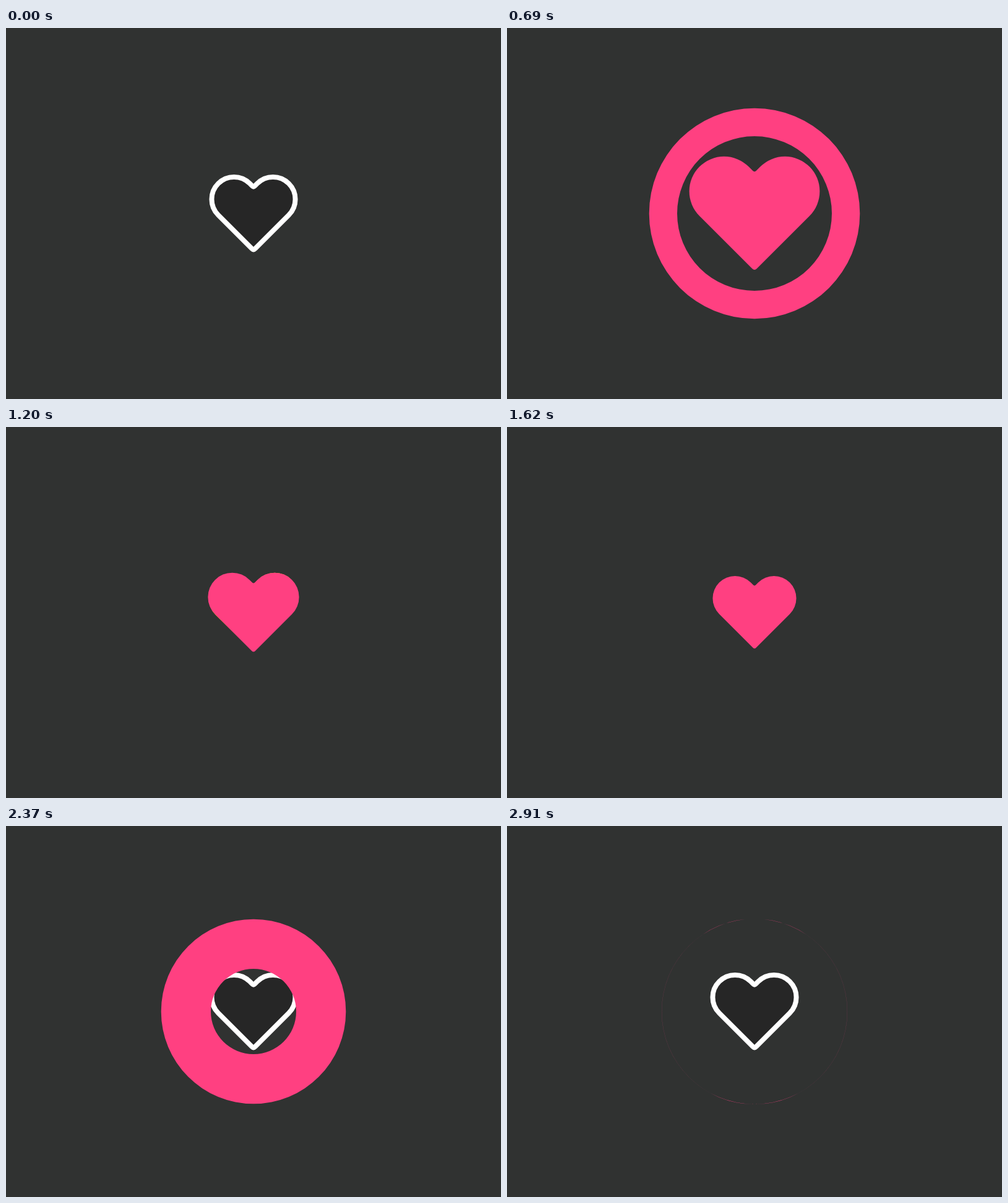
An HTML page with a canvas that plays this animation: 800 by 600 pixels, repeating every 3.39 s.

```html
<!DOCTYPE html>
<html lang="en">
<head>
<meta charset="utf-8">
<title>Like button</title>
<style>
  html, body { margin: 0; width: 100%; height: 100%; overflow: hidden; background: #303231; }
  canvas { display: block; width: 800px; height: 600px; }
</style>
</head>
<body>
<canvas id="stage" width="800" height="600"></canvas>
<script>
const ctx = document.getElementById('stage').getContext('2d');
const LOOP = 3390, STEP = 30;
const LIKE = 330, UNLIKE = 2130, RING_TIME = 780;
const BG = '#303231', PINK = '#ff4081', YELLOW = '#ffcc00', PURPLE = '#aa33cc';

const heart = new Path2D(
  'M-57 2.5 A36 36 0 0 1 -6 -48.5 L-2 -44.5 Q0 -42.5 2 -44.5 L6 -48.5' +
  'A36 36 0 0 1 57 2.5 L2.5 57 Q0 59.5 -2.5 57 Z');

// Smooth monotone curve through [time, value] keys
function curve(keys) {
  const slope = i => (keys[i + 1][1] - keys[i][1]) / (keys[i + 1][0] - keys[i][0]);
  const last = keys.length - 1;
  const tangent = keys.map((k, i) => {
    if (i === 0) return slope(0);
    if (i === last) return 0;
    const a = slope(i - 1), b = slope(i);
    return a * b <= 0 ? 0 : 2 * a * b / (a + b);
  });
  return t => {
    if (t <= keys[0][0]) return keys[0][1];
    if (t >= keys[last][0]) return keys[last][1];
    let i = 0;
    while (t > keys[i + 1][0]) i++;
    const [t0, v0] = keys[i], [t1, v1] = keys[i + 1];
    const d = t1 - t0, x = (t - t0) / d, y = 1 - x;
    return v0 * (1 + 2 * x) * y * y + v1 * x * x * (3 - 2 * x) +
      d * x * y * (tangent[i] * y - tangent[i + 1] * x);
  };
}

const outer = curve([[-30, 0], [150, 104.5], [240, 149.3], [330, 171.6], [360, 170.3],
  [510, 157.5], [600, 151.5], [780, 150.05]]);
const inner = curve([[150, 0], [240, 69], [360, 125], [510, 141.5], [600, 146.5], [780, 149.95]]);
const press = curve([[30, 1], [180, 0.86], [330, 0.72]]);
const pop = curve([[450, 0], [460, 0], [720, 1.62], [990, 0.855], [1200, 1.09],
  [1380, 0.965], [1500, 1.015], [1620, 1]]);

function wobble(t) {
  return t > 800 && t < 1560
    ? Math.sin((t - 800) * 2 * Math.PI / 520) * Math.exp((930 - t) / 200) : 0;
}

function place(sx, sy, skew, draw) {
  ctx.save();
  ctx.transform(sx, skew * sx, 0, sy, 400, 300);
  draw();
  ctx.restore();
}

function fillHeart(color, sx, sy = sx, skew = 0) {
  place(sx, sy, skew, () => {
    ctx.fillStyle = color;
    ctx.fill(heart);
  });
}

function echo(t, color, delay, skew, squash) {
  const s = pop(t - delay), w = wobble(t);
  fillHeart(color, s * (1 + squash * w), s * (1 - squash * w), skew * w);
}

function outlineHeart(s) {
  place(s, s, 0, () => {
    ctx.fillStyle = '#262626';
    ctx.fill(heart);
    ctx.strokeStyle = '#fff';
    ctx.lineWidth = 8;
    ctx.lineJoin = 'round';
    ctx.stroke(heart);
  });
}

function ring(t) {
  const r = inner(t);
  ctx.fillStyle = PINK;
  ctx.beginPath();
  ctx.arc(400, 300, outer(t), 0, 2 * Math.PI);
  if (r > 0) {
    ctx.moveTo(400 + r, 300);
    ctx.arc(400, 300, r, 0, 2 * Math.PI, true);
  }
  ctx.fill();
}

function render(t) {
  ctx.fillStyle = BG;
  ctx.fillRect(0, 0, 800, 600);

  if (t < LIKE + 150) {
    outlineHeart(press(t));
  } else if (t >= UNLIKE + 150) {
    outlineHeart(1);
  } else {
    if (t < 1560) {
      echo(t, PURPLE, 43, 0.045, 0.037);
      echo(t, YELLOW, 37, 0.1, 0.008);
    }
    fillHeart(PINK, pop(t));
  }

  if (t >= UNLIKE) ring(t - UNLIKE);
  else if (t >= LIKE && t < LIKE + RING_TIME) ring(t - LIKE);
}

const start = performance.now();
function tick() {
  const t = (performance.now() - start) % LOOP;
  render(Math.floor(t / STEP) * STEP);
  requestAnimationFrame(tick);
}
tick();
</script>
</body>
</html>
```
